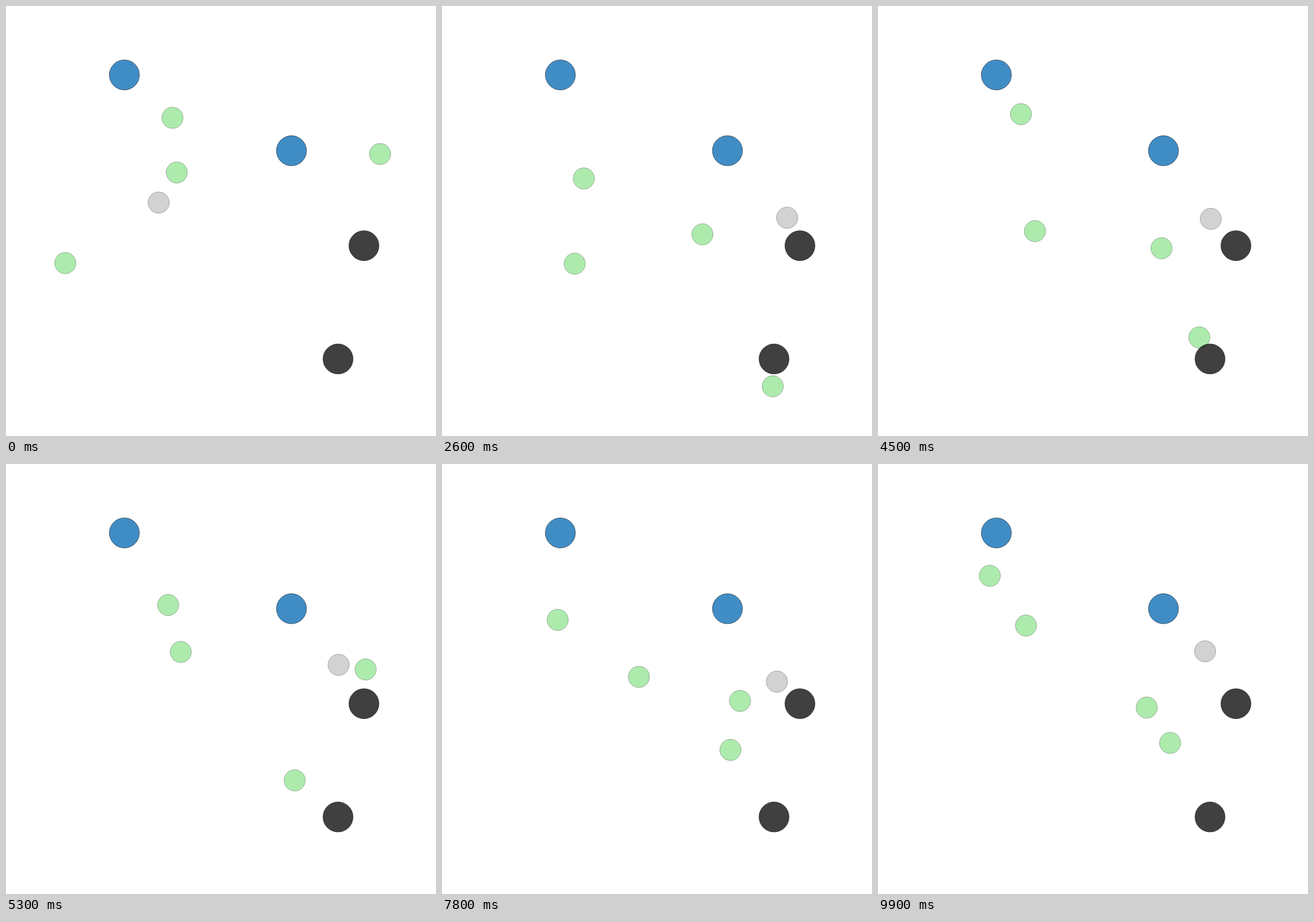
An HTML page with a canvas that plays this animation: 700 by 700 pixels, repeating every 10 s.

```html
<!DOCTYPE html>
<html>
<head>
<meta charset="utf-8">
<style>
html, body { margin: 0; width: 100%; height: 100%; overflow: hidden; background: #fff; }
canvas { display: block; }
</style>
</head>
<body>
<canvas width="700" height="700"></canvas>
<script>
const ctx = document.querySelector('canvas').getContext('2d');
const GREEN = { color: 'limegreen', alpha: .4, r: 17.3, swing: 55 };
const GRAY = { color: '#8f8f8f', alpha: .4, r: 17.3, swing: 15 };
const BLUE = { color: '#0067b3', alpha: .75, r: 24.5 };
const BLACK = { color: '#000', alpha: .75, r: 24.5 };

const anchors = [[BLUE, 192.7, 112.2], [BLUE, 464.7, 235.6], [BLACK, 582.7, 390.2], [BLACK, 540.5, 574.6]];

// Each moving ball has one key point per time
const times = [0, 1.6, 3.6, 5.3, 6.7, 8.8, 9.9];
const balls = [
  [GREEN, [96.5, 418.5], [224.5, 399.5], [144.5, 221], [264, 229.5], [210, 358], [235, 242], [182, 182]],
  [GREEN, [271, 182], [275.5, 409], [185, 324], [284.5, 306], [251.5, 336], [279, 342], [241, 263]],
  [GREEN, [609, 241], [481, 315], [417.5, 526], [585.5, 334.5], [553, 348], [510.5, 360], [437.5, 396.5]],
  [GREEN, [278, 271], [504.5, 606], [469, 594.5], [470, 515], [401, 576.5], [506.5, 469], [475.5, 454]],
  [GRAY, [248.5, 320], [590.5, 335], [561, 343], [541.5, 327], [556, 366], [522, 320], [532.5, 305]]
];

function disc({ color, alpha, r }, x, y) {
  ctx.globalAlpha = alpha;
  ctx.fillStyle = color;
  ctx.beginPath();
  ctx.arc(x, y, r, 0, 2 * Math.PI);
  ctx.fill();
  ctx.stroke();
}

// Ease between key points, swinging out to a new side on every leg
function position([kind, ...points], index, t) {
  const next = times.findIndex(time => time >= t) || 1, leg = next - 1;
  const u = (t - times[leg]) / (times[next] - times[leg]);
  const ease = u * u * (3 - 2 * u);
  const angle = 2.4 * (leg * balls.length + index);
  const out = kind.swing * Math.sin(Math.PI * u);
  const [x, y] = points[leg].map((from, axis) => from + (points[next][axis] - from) * ease);
  return [x + out * Math.cos(angle), y + out * Math.sin(angle)];
}

function draw(now) {
  const t = Math.floor(now % 10000 / 100) / 10;
  ctx.clearRect(0, 0, 700, 700);
  ctx.lineWidth = .7;
  balls.forEach((ball, i) => disc(ball[0], ...position(ball, i, t)));
  anchors.forEach(anchor => disc(...anchor));
}

const start = performance.now();
function loop() {
  draw(performance.now() - start);
  requestAnimationFrame(loop);
}
loop();
</script>
</body>
</html>
```
